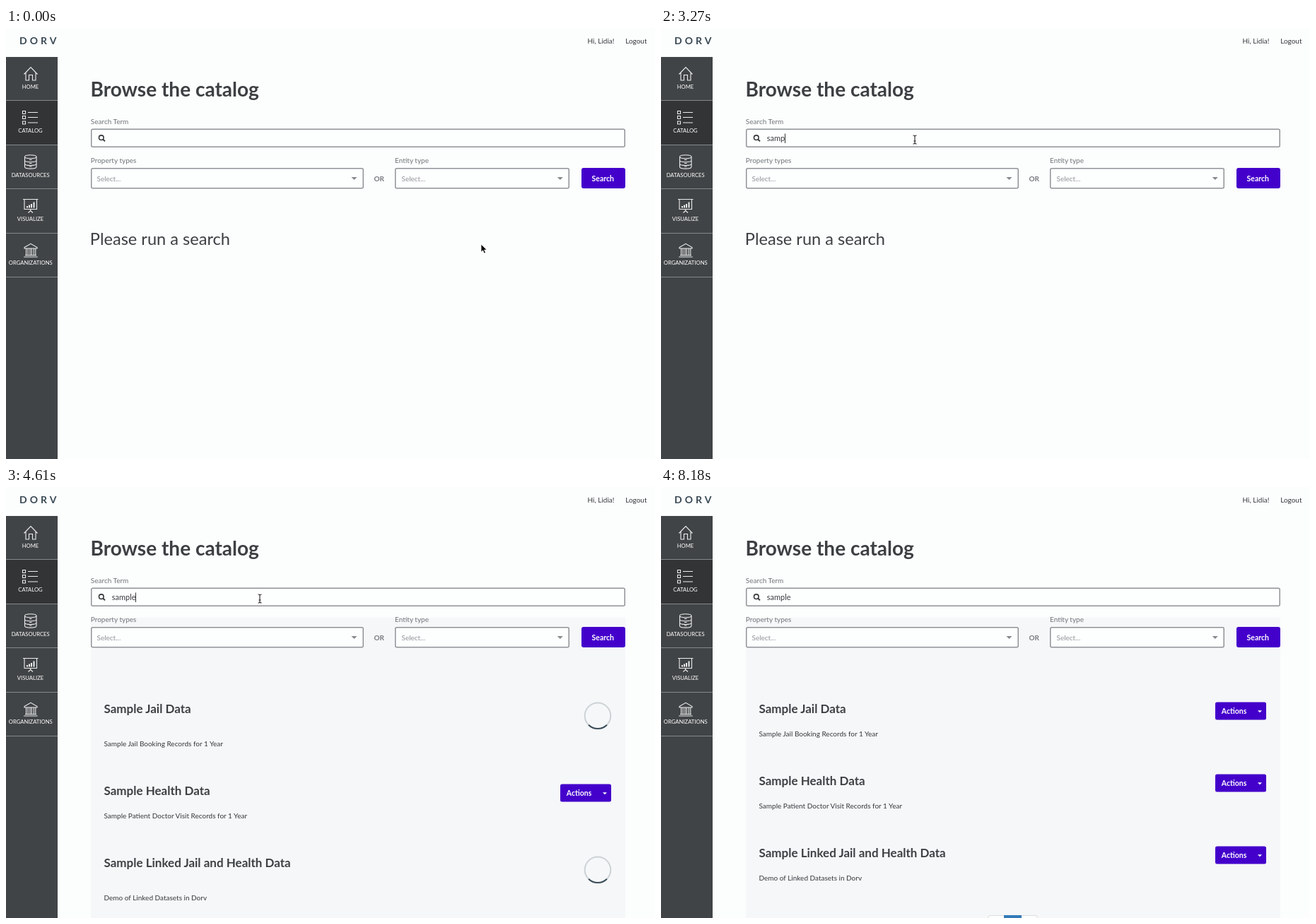
An HTML page for the animation above (8.28 s loop, 918x610 px).

```html
<!DOCTYPE html>
<html lang="en">
<head>
<meta charset="utf-8">
<title>Catalog search</title>
<style>
  html, body { margin: 0; width: 100%; height: 100%; overflow: hidden; background: #fcfdfd; }
  svg { display: block; width: 918px; height: 610px; font: 10px Lato, sans-serif; }
  .bold { font-weight: 700; }
  .label { fill: #707478; }
  .hint { fill: #8f9296; }
  .dark { fill: #3d4043; }
  .field { fill: #fdfefe; stroke: #909397; stroke-width: 1.5; }
  .nav { font-size: 7.7px; fill: #fff; text-anchor: middle; }
  .icon { fill: none; stroke: #eceded; stroke-width: 1.1; }
  .button { fill: #4400cb; }
  .onButton { font-size: 10.5px; font-weight: 700; fill: #fff; }
</style>
</head>
<body>
<svg id="stage" viewBox="0 0 918 610" xmlns="http://www.w3.org/2000/svg">
  <rect width="918" height="610" fill="#fcfdfd"/>
  <rect id="panel" x="120" y="185" width="756" height="425" fill="#f6f7f9"/>

  <text class="bold" x="19" y="23" font-size="14" letter-spacing="4" fill="#3a4a55">DORV</text>
  <text x="860.5" y="22.3" text-anchor="end" fill="#35383b">Hi, Lidia!</text>
  <text x="906.5" y="22.3" text-anchor="end" fill="#35383b">Logout</text>

  <rect y="41" width="73" height="569" fill="#414446"/>
  <rect y="103" width="73" height="62" fill="#333436"/>
  <path d="M0 102.5H73M0 165.5H73M0 227.5H73M0 290.5H73M0 352.5H73" stroke="#85888a"/>
  <g class="icon">
    <path d="M25.5 65.5L35 55.5L44.5 65.5M28 63.5V74H32.5V66.5H37.5V74H42V63.5"/>
    <path d="M23.5 117.5h4v4h-4zM23.5 124.5h4v4h-4zM23.5 132h4v4h-4zM31 119.5H45M31 126.5H45M31 134H45"/>
    <path d="M26.5 182.5V196.5C26.5 200 43 200 43 196.5V182.5M26.5 187.5C26.5 190.5 43 190.5 43 187.5M26.5 192.2C26.5 195.2 43 195.2 43 192.2M33 186.5h3.5M33 191.5h3.5M33 196h3.5"/>
    <ellipse cx="34.75" cy="182.3" rx="8.25" ry="2.5"/>
    <path d="M24 242.5H45.5M26 243V256.5H43.5V243M34.7 257V259.5M31.5 261.5L34.7 258.5L38 261.5"/>
    <path d="M30 254.5V252M33 254.5V250.5M36 254.5V249M39.5 254.5V246.5" stroke-width="2"/>
    <path d="M26 310.5L35 305.3L44 310.5V312H26ZM28.5 312V321.5M31 312V321.5M34 312V321.5M36.3 312V321.5M39.3 312V321.5M41.8 312V321.5M27 321.8H43M25.3 324H44.7"/>
  </g>
  <g class="nav">
    <text x="34.5" y="85.7">HOME</text>
    <text x="34.5" y="148">CATALOG</text>
    <text x="34.7" y="210.6">DATASOURCES</text>
    <text x="34.5" y="273">VISUALIZE</text>
    <text x="34.8" y="335.4">ORGANIZATIONS</text>
  </g>

  <text class="bold dark" x="119.5" y="97" font-size="28">Browse the catalog</text>
  <text class="label" x="119.8" y="135.5">Search Term</text>
  <rect class="field" x="120.75" y="143.25" width="754.5" height="25" rx="2"/>
  <circle cx="134.8" cy="155.2" r="3.3" fill="none" stroke="#35383b" stroke-width="1.6"/>
  <path d="M137.2 157.6L140 160.4" stroke="#35383b" stroke-width="2"/>

  <text class="label" x="119.8" y="191">Property types</text>
  <rect class="field" x="120.75" y="198.75" width="384.5" height="28" rx="2"/>
  <text class="hint" x="128.5" y="216.6">Select...</text>
  <path d="M488.5 211h8l-4 4z" fill="#85888c"/>
  <text class="bold" x="520.5" y="217" fill="#777a80">OR</text>
  <text class="label" x="550" y="191">Entity type</text>
  <rect class="field" x="550.75" y="198.75" width="245.5" height="28" rx="2"/>
  <text class="hint" x="559.5" y="216.6">Select...</text>
  <path d="M779.8 211h8l-4 4z" fill="#85888c"/>
  <rect class="button" x="814" y="198" width="62" height="29" rx="3"/>
  <text class="onButton" x="844.3" y="216.6" text-anchor="middle">Search</text>

  <text id="typed" x="149.7" y="160" font-size="11" fill="#3a3c3f"></text>
  <path id="caret" d="M0 149.5V163" stroke="#333" stroke-width="1"/>
  <text id="prompt" class="dark" x="118.8" y="306.5" font-size="23.6">Please run a search</text>

  <g id="rows"></g>
  <g id="pager">
    <path d="M463 612V608.5Q463 606.5 465 606.5H530Q532 606.5 532 608.5V612" fill="#fcfdfd" stroke="#dcdee1"/>
    <rect x="485" y="606" width="25" height="4" fill="#337ab7"/>
  </g>
  <g id="loader"></g>

  <path id="arrow" d="M0 0V11.2L2.6 8.8L4.4 13L6.4 12.1L4.6 8.1H8.1Z" fill="#000" stroke="#fff" stroke-width=".8"/>
  <g id="beam" fill="none" stroke="#222" stroke-width="1.1">
    <path d="M-2.5 -6Q0 -6 0 -4.5Q0 -6 2.5 -6M0 -5V5M-2.5 6Q0 6 0 4.5Q0 6 2.5 6M-1.5 2H1.5"/>
    <circle id="ring" cx=".7" cy="-1.2" r="7.8"/>
  </g>
</svg>

<script>
const LOOP = 8280;
const $ = id => document.getElementById(id);
const show = (id, on) => $(id).setAttribute("visibility", on ? "visible" : "hidden");
const move = (id, x, y) => $(id).setAttribute("transform", `translate(${x} ${y})`);

// Latest entry whose start time has passed
const at = (steps, t) => steps.filter(s => s[0] <= t).pop();

const pointer = [
  [0, "arrow", 672, 306],
  [900, "arrow", 603, 290],
  [1050, "arrow", 548, 259],
  [1200, "arrow", 503, 193],
  [1350, "beam", 406, 164],
  [1500, "beam", 359, 158],
  [7150, "beam", 385, 161],
  [7300, "arrow", 446, 328],
  [7430, "arrow", 602, 470],
  [7580, "arrow", 747, 587],
  [7730, "none", 0, 0]
];
const typing = [[0, ""], [2970, "s"], [3120, "sam"], [3270, "samp"], [3410, "sample"]];
const blink = [
  [0, false], [1780, true], [2230, false], [2680, true], [5210, false], [5810, true],
  [6260, false], [6710, true], [7150, false], [7730, true], [8180, false]
];
// Which result rows have loaded
const loaded = [[0, null], [4460, [0, 0, 0]], [4610, [0, 1, 0]], [4760, [1, 1, 1]]];
const results = [
  ["Sample Jail Data", "Sample Jail Booking Records for 1 Year"],
  ["Sample Health Data", "Sample Patient Doctor Visit Records for 1 Year"],
  ["Sample Linked Jail and Health Data", "Demo of Linked Datasets in Dorv"]
];

// Quarter arc centred on the given angle
function spinner(x, y, angle) {
  return `<g transform="translate(${x} ${y}) rotate(${angle})" fill="none" stroke-width="2">
    <circle r="18.3" stroke="#cdd2d5"/>
    <path d="M12.94 -12.94A18.3 18.3 0 0 1 12.94 12.94" stroke="#3c4f5a"/></g>`;
}

function actions(y) {
  return `<rect class="button" x="784" y="${y}" width="72" height="25" rx="2.5"/>
    <text class="onButton" x="792.8" y="${y + 16.5}">Actions</text>
    <path d="M844 ${y + 11.7}h6l-3 3z" fill="#fff"/>`;
}

function resultRows(done, angle) {
  let y = 304.5;
  return results.map(([title, note], i) => {
    const row = `<text class="bold dark" x="138.5" y="${y + 15.5}" font-size="17">${title}</text>
      <text x="138.5" y="${y + (done[i] ? 48.6 : 62.6)}" fill="#35383b">${note}</text>
      ${done[i] ? actions(y) : spinner(837, y + 19.3, angle)}`;
    y += done[i] ? 102 : 116;
    return row;
  }).join("");
}

let lastKey = "";

function draw(t) {
  const [, shape, x, y] = at(pointer, t);
  const text = at(typing, t)[1];
  const done = at(loaded, t)[1];
  const caret = at(blink, t)[1];
  const ring = t >= 1780 && t < 1930;
  const waiting = t >= 4010 && !done;
  const tick = t >= 4010 && t < 4760 ? Math.floor((t - 4010) / 150) : -1;

  const key = [shape, x, y, text, done, caret, ring, waiting, tick].join();
  if (key === lastKey) return;
  lastKey = key;

  show("arrow", shape === "arrow");
  show("beam", shape === "beam");
  show("ring", ring);
  if (shape !== "none") move(shape, x, y);

  $("typed").textContent = text;
  const width = text ? $("typed").getComputedTextLength() : 0;
  move("caret", Math.floor(150 + width) + .5, 0);
  show("caret", caret);

  show("prompt", t < 4010);
  show("panel", done);
  show("pager", done && done.every(Boolean));
  $("loader").innerHTML = waiting ? spinner(498, 305, tick * 48 - 51) : "";
  $("rows").innerHTML = done ? resultRows(done, tick * 48 - 102) : "";
}

const start = performance.now();
function frame() {
  draw((performance.now() - start) % LOOP);
  requestAnimationFrame(frame);
}
frame();
</script>
</body>
</html>
```
